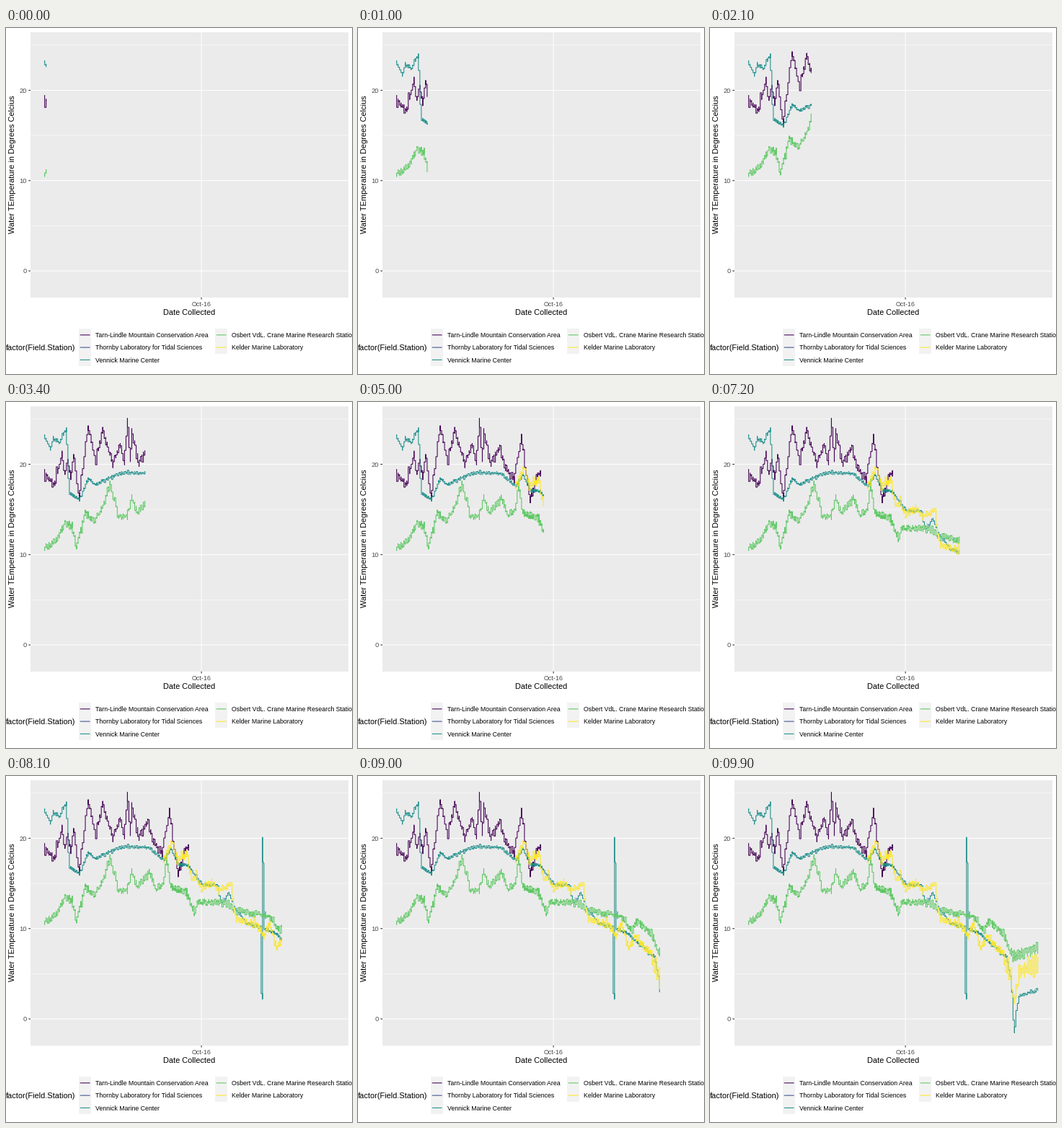
Animation, 480 px wide and 480 px high, one loop 10 s. Source, as a matplotlib script:

```python
import numpy as np
import matplotlib.pyplot as plt
from matplotlib.animation import FuncAnimation
from matplotlib.patches import Rectangle

SIZE, DPI = 480, 72
FRAMES, INTERVAL = 100, 100
DAYS_PER_FRAME = 2
X0, DX = 53.6, 2.015      # first day and day width, px
Y0, DY = 337.0, 12.53     # zero degrees and degree height, px

PURPLE, BLUE, TEAL, GREEN, YELLOW = (
    "#440154", "#3B528B", "#21908C", "#5DC863", "#FDE725")

plt.rcParams["font.family"] = "Liberation Sans"

# Turning points of each curve: (day, degrees)
MOUNTAIN = [(0, 18.9), (7, 17.8), (12, 21.1), (14, 19.1), (16, 20.3),
            (18, 18.6), (20, 20.8), (24, 16.3), (30, 24.2), (35, 20.4),
            (40, 23.8), (47, 20), (52, 22.2), (55, 20.3), (57, 25),
            (59, 20.6), (60, 23.7), (65, 20.1), (71, 21.9), (75, 19.6),
            (81, 18.3), (86, 23), (92, 16), (97, 18.8), (99, 18.9)]
CENTER = [(0, 23.2), (4, 21.6), (6, 22.9), (10, 22.4), (15, 24), (17, 16.8),
          (24, 16.1), (30, 18.4), (35, 17.8), (52, 19), (72, 19), (82, 17.6),
          (87, 18.9), (92, 17.2), (99, 17), (108, 14.9), (119, 14.8),
          (122, 12.8), (127, 14), (131, 12.2), (139, 10.6), (158, 9.6),
          (178, 6.8), (181, 4), (183, -1.4), (186, 2.5), (199, 3.2)]
STATION = [(0, 10.7), (8, 11.5), (14, 13.5), (19, 13.3), (22, 10.9),
           (28, 14.7), (34, 13.7), (40, 15.2), (45, 17.8), (51, 14.2),
           (57, 14.2), (60, 16.3), (64, 14.6), (72, 16.3), (77, 14.3),
           (82, 15), (84, 17.9), (87, 14.6), (98, 14.1), (103, 11.6),
           (105, 12.9), (126, 13), (131, 12), (155, 11.4), (162, 9.7),
           (165, 10.9), (175, 9.5), (182, 6.9), (199, 7.8)]
LABORATORY = [(82, 17.7), (88, 19.6), (92, 17.5), (98, 18.2), (101, 15.4),
              (104, 15.9), (108, 14.4), (115, 15.3), (120, 14.2), (128, 15),
              (132, 11.1), (146, 10.4), (151, 9.2), (155, 10.7), (160, 7.7),
              (164, 9.1), (175, 7.2), (180, 4.7), (183, 2), (187, 5.2),
              (199, 6.3)]


def px(day):
    return X0 + DX * day


def py(temp):
    return Y0 - DY * temp


def daily_readings(keys, swing, seed, tail=1):
    """Per day: first reading, the two extremes, last reading."""
    rng = np.random.default_rng(seed)
    kx, ky = np.transpose(keys)
    day = np.arange(kx[0], kx[-1] + 1)
    n = len(day)
    mean = np.interp(day, kx, ky)
    size = swing * np.where(day > 175, tail, 1)
    # a day starts where the one before it stopped
    edge = np.interp(np.append(day, day[-1] + 1) - 0.5, kx, ky)
    edge += np.append(size, size[-1]) * rng.normal(0, 0.7, n + 1)
    low = mean - size * rng.uniform(0, 1, n)
    high = mean + size * rng.uniform(0, 1, n)
    rising = edge[1:] > edge[:-1]
    temp = np.column_stack([edge[:-1], np.where(rising, low, high),
                            np.where(rising, high, low), edge[1:]])
    return day, temp


def with_glitch(readings, at):
    """A sensor fault: a plunge, then a leap, over three days."""
    day, temp = readings
    temp[at, 2:] = 2.8
    temp[at + 1] = 2.8, 2.2, 20.1, 17.5
    temp[at + 2, :2] = 17.2
    return day, temp


fig = plt.figure(figsize=(SIZE / DPI, SIZE / DPI), dpi=DPI, facecolor="white")
ax = fig.add_axes([0, 0, 1, 1])
ax.set_xlim(0, SIZE)
ax.set_ylim(SIZE, 0)
ax.axis("off")


def box(x, y, w, h, color):
    ax.add_patch(Rectangle((x, y), w, h, fc=color, ec="none", zorder=0))


def line(x, y, color, width=1.07, z=1):
    return ax.plot(x, y, color=color, lw=width, zorder=z, snap=False,
                   solid_capstyle="butt", solid_joinstyle="round")[0]


def label(x, y, s, size=8.8, color="black", ha="left", va="baseline", angle=0):
    ax.text(x, y, s, fontsize=size, color=color, ha=ha, va=va, rotation=angle)


def draw_panel():
    left, right, top, bottom = 34, 474.5, 5.5, 373.8
    tick, ink, grey = 2.75, "#333333", "#4D4D4D"
    box(left, top, right - left, bottom - top, "#EBEBEB")
    for t in (5, 15, 25):
        line([left, right], [py(t)] * 2, "white", 0.53)
    for t in (0, 10, 20):
        line([left, right], [py(t)] * 2, "white")
        line([left - tick, left], [py(t)] * 2, ink)
        label(29.2, py(t) + 3.2, str(t), 9.2, grey, "right")
    x = 271.1
    line([x, x], [top, bottom], "white")
    line([x, x], [bottom, bottom + tick], ink)
    label(x, 386, "Oct-16", 9, grey, "center")
    label(254.5, 398, "Date Collected", 11, ha="center")
    label(9.3, 189.4, "Water TEmperature in Degrees Celcius", 11,
          ha="center", va="center", angle=90)


def draw_legend():
    key = 17.28
    label(0, 447, "factor(Field.Station)", 11)
    columns = [
        (101, [("Tarn-Lindle Mountain Conservation Area", PURPLE),
               ("Thornby Laboratory for Tidal Sciences", BLUE),
               ("Vennick Marine Center", TEAL)]),
        (290, [("Osbert VdL. Crane Marine Research Station", GREEN),
               ("Kelder Marine Laboratory", YELLOW)])]
    for x, rows in columns:
        for i, (name, color) in enumerate(rows):
            y = 417.2 + i * key
            mid = y + key / 2
            box(x, y, key, key, "#F2F2F2")
            line([x + 1.7, x + key - 1.7], [mid, mid], color)
            label(x + 23, mid + 3.2, name)


draw_panel()
draw_legend()

series = [
    (PURPLE, daily_readings(MOUNTAIN, 0.4, 3)),
    (TEAL, with_glitch(daily_readings(CENTER, 0.2, 5), 149)),
    (GREEN, daily_readings(STATION, 0.42, 7, tail=1.6)),
    (YELLOW, daily_readings(LABORATORY, 0.45, 9, tail=2)),
]
traces = []
for z, (color, (day, temp)) in enumerate(series, 3):
    xs, ys = np.repeat(px(day), 4), py(temp).ravel()
    traces.append((line([], [], color, z=z), day[0], xs, ys))


def update(i):
    shown = DAYS_PER_FRAME * (i + 1)
    for trace, start, xs, ys in traces:
        n = 4 * int(max(0, shown - start))
        trace.set_data(xs[:n], ys[:n])
    return [t[0] for t in traces]


anim = FuncAnimation(fig, update, frames=FRAMES, interval=INTERVAL,
                     repeat=True, repeat_delay=0, blit=False)
plt.show()
```
